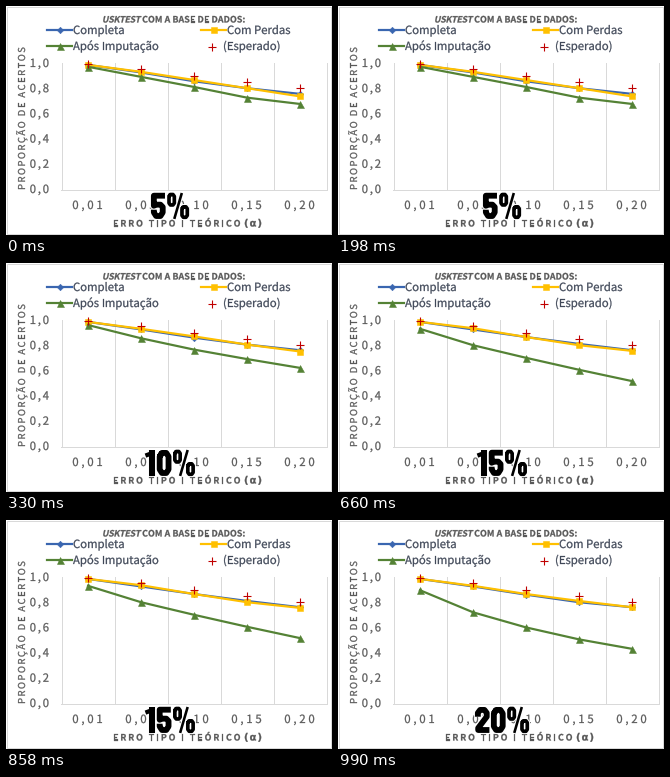
These frames come from a looping animation (326 px wide and 229 px high, 1.32 s). A matplotlib script:

```python
import matplotlib.pyplot as plt
from matplotlib.animation import FuncAnimation
from matplotlib.patches import PathPatch, Rectangle
from matplotlib.textpath import TextPath
from matplotlib.transforms import Affine2D

W, H, DPI = 326, 229, 64
PX = 72 / DPI  # one pixel in points
BLUE, ORANGE, GREEN, RED = "#3A66B0", "#FFC000", "#548235", "#C00000"
GREY, INK, GRID = "#595959", "#404858", "#D9D9D9"
SANS = "Noto Sans CJK JP"

fig = plt.figure(figsize=(W / DPI, H / DPI), dpi=DPI, facecolor="white")
ax = fig.add_axes([0, 0, 1, 1])
ax.set_xlim(0, W)
ax.set_ylim(H, 0)
ax.axis("off")


def glyph(s, size, font):
    return TextPath((0, 0), s, size=size, prop=font)


def advance(c, size, font):
    """Pen advance of one character."""
    edge = glyph("H", size, font).vertices[:, 0].max()
    return glyph(c + "H", size, font).vertices[:, 0].max() - edge


def label(s, x, y, size, color=GREY, bold=False, track=0, align=0,
          angle=0, skew=0, family=SANS):
    """Draw tracked text from baseline point (x, y); return its width."""
    font = {"family": family, "weight": "bold" if bold else "normal"}
    steps = [advance(c, size, font) + track for c in s]
    width = sum(steps) - track
    pen = -align * width
    for c, step in zip(s, steps):
        if c != " ":
            place = (Affine2D().skew_deg(skew, 0).translate(pen, 0)
                     .scale(1, -1).rotate_deg(angle).translate(x, y))
            ax.add_patch(PathPatch(place.transform_path(glyph(c, size, font)),
                                   fc=color, ec=color, lw=0.25 * PX))
        pen += step
    return width + track


def stroke(xs, ys, color, width, **kw):
    return ax.plot(xs, ys, color=color, lw=width * PX, **kw)[0]


def series(xs, ys, color, marker, size, width=2.2, **kw):
    return stroke(xs, ys, color, width, marker=marker, ms=size * PX,
                  mec=color, mew=kw.pop("mew", 0.5) * PX, **kw)


def level(v):
    return 183 - 126 * v


# Chart frame and grid
ax.add_patch(Rectangle((0.5, 0.5), W - 2, H - 2, fc="white", ec=GRID, lw=PX))
for i in range(6):
    x = 55.5 + 53 * i
    stroke([x, x], [57, 183], GRID, 1)
stroke([55, 321], [183.5, 183.5], GRID, 1)

# Titles and tick labels
pen = 96 + label("USKTEST", 96, 16.5, 8.7, GREY, True, -0.2, skew=12)
label("COM A BASE DE DADOS:", pen + 2, 16.5, 8.8, GREY, True, 0.1)
label("PROPORÇÃO DE ACERTOS", 19, 184, 9.5, GREY, track=1.45, angle=-90)
label("ERRO TIPO I TEÓRICO", 107, 220.5, 8.8, GREY, True, 1.9)
label("(α)", 238, 220.5, 10, GREY, True, 1, family="DejaVu Sans")

centres = [82 + 53 * i for i in range(5)]
alphas = [0.01, 0.05, 0.10, 0.15, 0.20]
for x, a in zip(centres, alphas):
    label(f"{a:.2f}".replace(".", ","), x - 0.5, 203, 11.3, GREY,
          track=2.8, align=0.5)
for i in range(6):
    v = i / 5
    label(f"{v:.1f}".replace(".", ","), 43, level(v) + 4, 11.3, GREY,
          track=1.8, align=1)

# Legend
MARKS = {"blue": (BLUE, "D", 4.6), "orange": (ORANGE, "s", 6.5),
         "green": (GREEN, "^", 7)}
PLUS = dict(color=RED, marker="+", size=8, width=0, mew=1.1, ls="none")
for key, x, y, name in [("blue", 53.5, 24, "Completa"),
                        ("orange", 207.5, 24, "Com Perdas"),
                        ("green", 53.5, 40, "Após Imputação")]:
    series([x - 12.5, x, x + 12.5], [y] * 3, *MARKS[key], markevery=[1])
    label(name, x + 13.5, y + 4, 11.3, INK)
series([205.5], [40.5], **PLUS)
label("(Esperado)", 217, 44, 11.3, INK)

# Data for 5, 10, 15 and 20 percent
DATA = {
    "blue": [[.985, .925, .855, .80, .755], [.985, .925, .86, .805, .76],
             [.985, .925, .865, .81, .76], [.985, .925, .86, .80, .76]],
    "orange": [[.985, .93, .865, .80, .735], [.985, .93, .87, .805, .75],
               [.985, .935, .865, .80, .755], [.985, .93, .865, .81, .76]],
    "green": [[.97, .89, .81, .725, .675], [.96, .855, .765, .69, .62],
              [.93, .80, .70, .605, .515], [.895, .72, .60, .505, .43]],
}
curves = {k: series(centres, centres, *MARKS[k], zorder=3) for k in DATA}
series(centres, [level(1 - a) for a in alphas], zorder=4, **PLUS)

# Heavy condensed numerals: (advance, [(stroke width, points), ...])
RING = [(2.9, 6), (5, 2.7), (9, 2.7), (11.1, 6), (11.1, 18), (9, 21.3),
        (5, 21.3), (2.9, 18), (2.9, 6), (5, 2.7)]
SMALL = [(0.6 * x, 0.52 * y) for x, y in RING]
HEAVY = {
    "0": (15.2, [(5.4, RING)]),
    "1": (10.8, [(5.6, [(6.8, 0), (6.8, 24)]), (4, [(0.5, 5.2), (6.5, 3)])]),
    "2": (14.8, [(5.4, [(2.9, 9), (2.9, 5.5), (5, 2.7), (9, 2.7), (11.1, 5.5),
                        (11.1, 9), (3.2, 19.5), (3.2, 21.3), (13.6, 21.3)])]),
    "5": (15.2, [(5.4, [(13.2, 2.5), (2.9, 2.5), (2.9, 11.8), (5, 10.8),
                        (9, 10.8), (11.1, 13), (11.1, 18), (9, 21.3),
                        (5, 21.3), (2.9, 18), (2.9, 15.5)])]),
    "%": (20.5, [(3.4, SMALL), (3.4, [(x + 12, y + 11.4) for x, y in SMALL]),
                 (2.4, [(13.6, 0), (6.6, 24)])]),
}


def heavy(s, centre, top, scale):
    pen = centre - scale * sum(HEAVY[c][0] for c in s) / 2
    lines = []
    for c in s:
        step, parts = HEAVY[c]
        for width, pts in parts:
            xs = [pen + scale * x for x, _ in pts]
            ys = [top + scale * y for _, y in pts]
            for color, extra, z in (("white", 2, 5), ("black", 0, 6)):
                lines.append(stroke(xs, ys, color, width * scale + extra,
                                    zorder=z, solid_capstyle="butt",
                                    solid_joinstyle="round"))
        pen += scale * step
    return lines


badges = [heavy(f"{p}%", 164, 187, 1.08) for p in (5, 10, 15, 20)]


def update(n):
    for key, line in curves.items():
        line.set_ydata([level(v) for v in DATA[key][n]])
    for i, badge in enumerate(badges):
        for part in badge:
            part.set_visible(i == n)
    return []


anim = FuncAnimation(fig, update, frames=4, interval=330, repeat=True,
                     repeat_delay=0, init_func=lambda: update(0))
plt.show()
```
